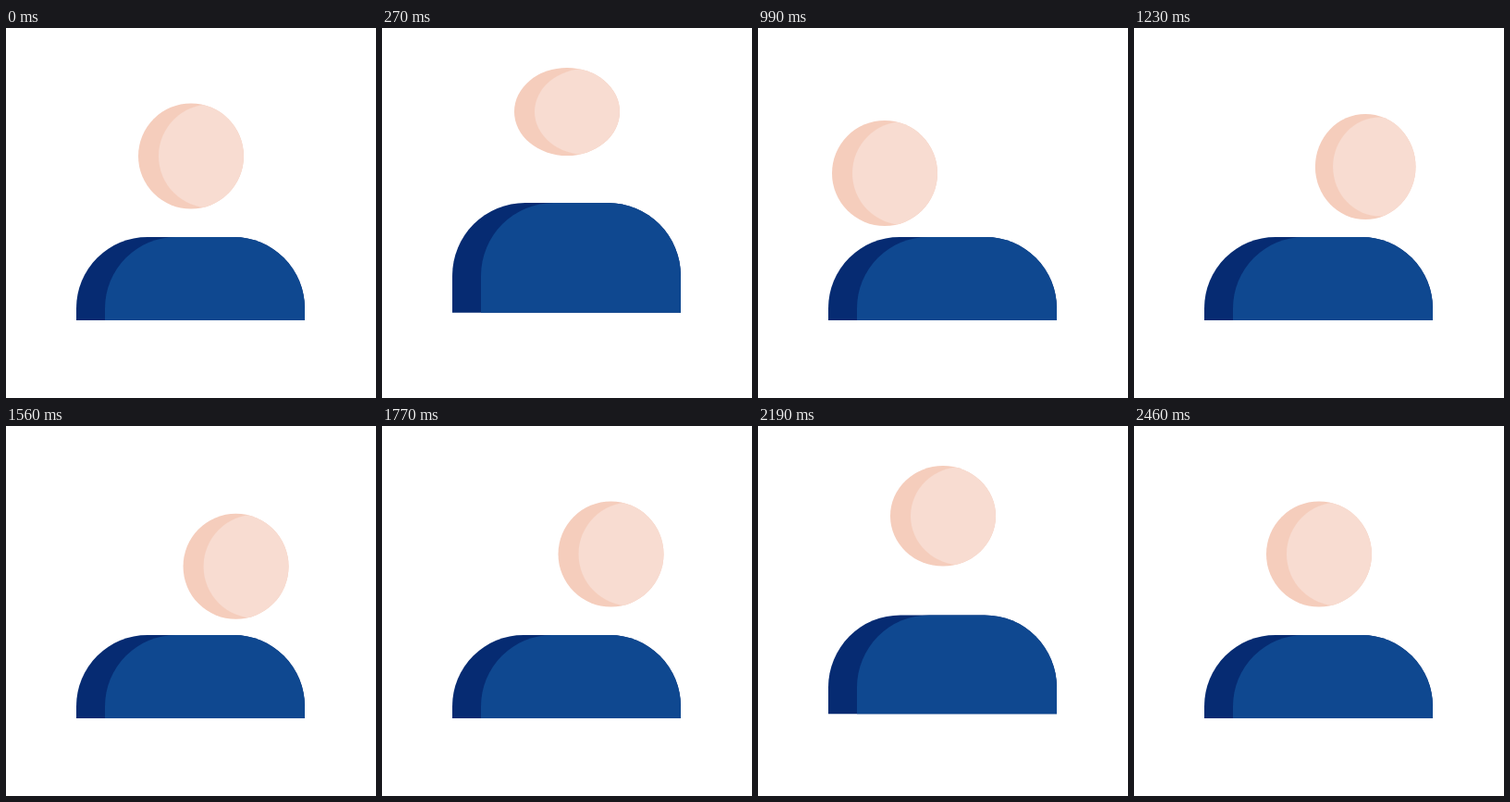
An HTML page with a canvas for the animation above (4520 ms loop, 400 px wide and 400 px high).

```html
<!DOCTYPE html>
<html lang="en">
<head>
<meta charset="utf-8">
<title>Hopping avatar</title>
<style>
  html, body { margin: 0; width: 100%; height: 100%; overflow: hidden; background: #fff; }
  canvas { display: block; width: 400px; height: 400px; }
</style>
</head>
<body>
<canvas id="stage" width="400" height="400"></canvas>
<script>
const ctx = document.getElementById("stage").getContext("2d");
const LOOP = 4520, STEP = 30;
const RADIUS = 57, CEILING = 43;
const SKIN = "#f8dcd1", SKIN_SHADE = "#f5cdbc", SHIRT = "#0f4890", SHIRT_SHADE = "#062b72";

// Eased 0 to 1 between two times.
function ramp(time, from, to) {
  const u = Math.min(1, Math.max(0, (time - from) / (to - from)));
  return u * u * (3 - 2 * u);
}

// Eased 0 to 1 and back to 0.
function pulse(time, from, rise, fall) {
  return ramp(time, from, from + rise) - ramp(time, from + rise, from + rise + fall);
}

function poseAt(time) {
  const jump = pulse(time, 0, 270, 270) + pulse(time, 1800, 270, 270);
  const landing = pulse(time, 540, 60, 120) + pulse(time, 1110, 60, 120);
  const crouch = pulse(time, 900, 90, 90) + pulse(time, 1530, 90, 90);
  const hop = pulse(time, 1020, 75, 75);
  const lowered = ramp(time, 300, 540) - ramp(time, 1680, 1770) - hop;

  // -1 is the left stop, 1 the right one.
  const side = 2 * ramp(time, 1020, 1170) - ramp(time, 300, 600) - ramp(time, 1770, 1980);
  const reach = side < 0 ? 59 : 47.5;

  // Landing presses the head against a side wall, jumping against the ceiling.
  const squash = .095 * landing;
  const x = 200 + side * (reach + RADIUS * squash + 4 * crouch);
  const bottom = 195.5 + 11.5 * lowered + 7 * crouch - 57.5 * Math.sqrt(jump);
  const halfHeight = Math.min(RADIUS, (bottom - CEILING) / 2);
  return { x, y: bottom - halfHeight, squash, scaleY: halfHeight / RADIUS, lift: 37 * jump };
}

function disc(x, radius, color) {
  ctx.beginPath();
  ctx.arc(x, 0, radius, 0, 2 * Math.PI);
  ctx.fillStyle = color;
  ctx.fill();
}

function drawHead({ x, y, squash, scaleY }) {
  ctx.save();
  ctx.translate(x, y);
  ctx.scale(1 - squash, scaleY);
  disc(0, RADIUS, SKIN_SHADE);
  ctx.clip();
  disc(21 - 91 * squash, 56 - 52 * squash, SKIN);
  ctx.restore();
}

function shoulders(left, lift, color) {
  const right = 323, top = 226 - lift, bottom = 316 - .22 * lift;
  const radius = 77 + .05 * lift;
  ctx.beginPath();
  ctx.moveTo(left, bottom);
  ctx.arcTo(left, top, left + radius, top, radius);
  ctx.arcTo(right, top, right, top + radius, radius);
  ctx.lineTo(right, bottom);
  ctx.fillStyle = color;
  ctx.fill();
}

function draw(now) {
  const pose = poseAt(Math.floor(now % LOOP / STEP) * STEP);
  ctx.fillStyle = "#fff";
  ctx.fillRect(0, 0, 400, 400);
  shoulders(76, pose.lift, SHIRT_SHADE);
  shoulders(107, pose.lift, SHIRT);
  drawHead(pose);
}

const start = performance.now();
function tick() {
  draw(performance.now() - start);
  requestAnimationFrame(tick);
}
tick();
</script>
</body>
</html>
```
